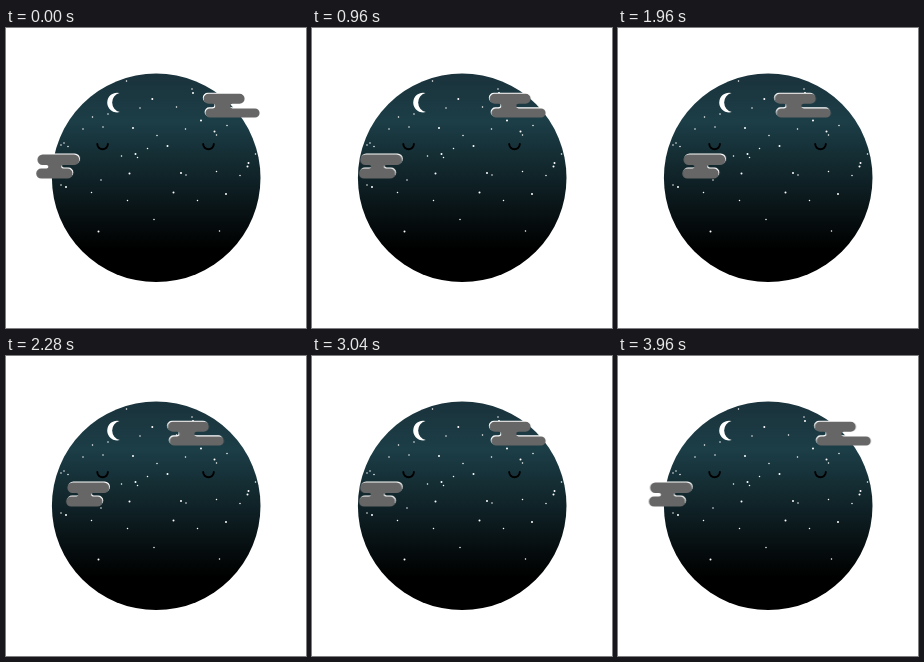
These frames come from a looping animation (300 by 300 pixels, 4000 ms). An HTML page:

```html
<!DOCTYPE html>
<html lang="en">
<head>
<meta charset="utf-8">
<title>Sleeping night planet</title>
<style>
  html, body { margin: 0; width: 100%; height: 100%; overflow: hidden; background: #fff; }
  svg { display: block; width: 100vw; height: 100vh; }
  .stars { fill: none; stroke: #fff; stroke-linecap: round; }
  .eyes { fill: none; stroke: #000; stroke-width: 1.9; stroke-linecap: round; }
  .cloud { animation: drift 2s linear infinite alternate; }
  .low { --shift: 34.8px; }
  .high { --shift: -41.6px; }
  @keyframes drift { to { transform: translateX(var(--shift)); } }
</style>
</head>
<body>
<svg viewBox="0 0 300 300">
  <defs>
    <linearGradient id="night" x1="0" y1="0" x2="0" y2="1">
      <stop offset="0" stop-color="#1a323b"/>
      <stop offset=".23" stop-color="#1c3e47"/>
      <stop offset=".84" stop-color="#000"/>
    </linearGradient>
    <path id="lowCloud" d="M36.6 126.6H68a5.2 5.2 0 0 1 0 10.4H57a1.8 1.8 0 0 0 0 3.6H61.5a5 5 0 0 1 0 10H35.2a5 5 0 0 1 0-10H40.5a1.8 1.8 0 0 0 0-3.6H36.6a5.2 5.2 0 0 1 0-10.4z"/>
    <path id="highCloud" d="M202.6 65.8H233.6a5 5 0 0 1 0 10H226.5a2.3 2.3 0 0 0 0 4.6H249a4.6 4.6 0 0 1 0 9.2H204a4.6 4.6 0 0 1 0-9.2H207a2.3 2.3 0 0 0 0-4.6H202.6a5 5 0 0 1 0-10z"/>
  </defs>

  <circle cx="150.2" cy="149.8" r="104.3" fill="url(#night)"/>

  <path class="stars" stroke-width="1.5" d="M120.5 53h0M186 61h0M170.5 79h0M134 80h0M86.5 89h0M102 86h0M77 101h0M97 99h0M179.5 101h0M210.5 107h0M151 107.5h0M221 97.5h0M62 118.5h0M58 115h0M55 117h0M115.5 128h0M131.5 129.5h0M141.5 120.5h0M249.5 126h0M234 147.5h0M210.5 143.5h0M180 147h0M95 152h0M55 157h0M85.5 164.5h0M191.5 172.5h0M121.5 172.5h0M148 191.5h0M213.5 203h0"/>
  <path class="stars" stroke-width="2" d="M187 65h0M146.3 71h0M195 92.5h0M127 100h0M208.5 103.5h0M129.5 126h0M161.5 118h0M242.5 135h0M241.5 138.5h0M175 145h0M123.5 145.5h0M60 159h0M167.5 164.5h0M220 166h0M92.5 203.5h0"/>

  <path fill="#fff" d="M113.5 65A9.85 9.85 0 1 0 113.8 84A9.77 9.77 0 0 1 113.5 65z"/>
  <path class="eyes" d="M91.3 116a5.3 5.3 0 0 0 10.6 0M197.2 116a5.3 5.3 0 0 0 10.6 0"/>

  <g class="cloud low">
    <use href="#lowCloud" x=".8" y="-1.1" fill="#fff"/>
    <use href="#lowCloud" fill="#666"/>
  </g>
  <g class="cloud high">
    <use href="#highCloud" x="-.8" y="-1.1" fill="#fff"/>
    <use href="#highCloud" fill="#666"/>
  </g>
</svg>
</body>
</html>
```
